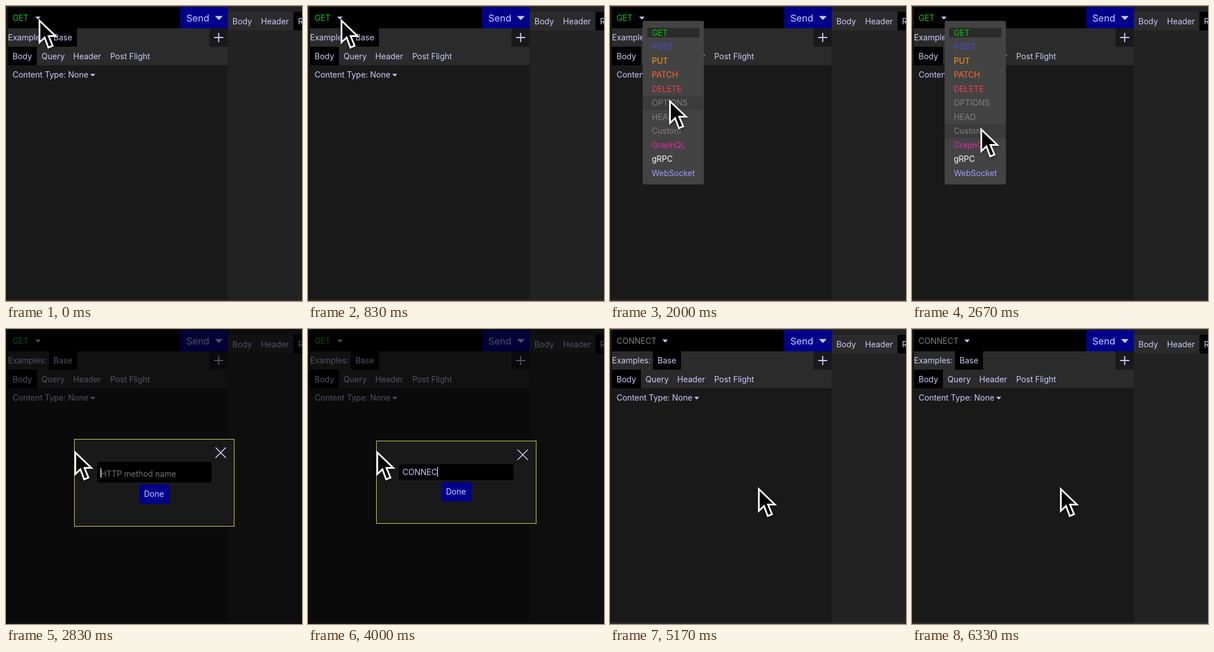
These frames come from a looping animation (517x515 px, 6490 ms). An HTML page:

```html
<!DOCTYPE html>
<html lang="en">
<head>
<meta charset="utf-8">
<title>Custom HTTP method</title>
<style>
  html, body { margin: 0; width: 100%; height: 100%; overflow: hidden; background: #191919; }
  svg { display: block; width: 517px; height: 515px; }
  text { font: 14px Inter, "Open Sans", sans-serif; fill: #ccccff; white-space: pre; }
  .big { font-size: 16.5px; }
  .off { display: none; }
  #cursor path { filter: drop-shadow(0 2px 2px rgba(0, 0, 0, .45)); }
</style>
</head>
<body>
<svg id="stage" viewBox="0 0 517 515"></svg>
<script>
const stage = document.getElementById('stage');
const LAVENDER = '#ccccff', BLUE = '#00008b', BAR = '#2b2b2b', GREY = '#808080';
const METHODS = [
  ['GET', '#00cc00'], ['POST', '#4a4ae0'], ['PUT', '#ff981a'], ['PATCH', '#ff6a26'],
  ['DELETE', '#f04040'], ['OPTIONS', GREY], ['HEAD', GREY], ['Custom', GREY],
  ['GraphQL', '#dc2ca4'], ['gRPC', '#ffffff'], ['WebSocket', '#9e9eff']
];
const ROW = 24.5, MENU_TOP = 34.5;

function add(parent, tag, attrs, content) {
  const el = document.createElementNS('http://www.w3.org/2000/svg', tag);
  for (const key in attrs) el.setAttribute(key, attrs[key]);
  if (content) el.textContent = content;
  return parent.appendChild(el);
}
const group = (parent, id) => add(parent, 'g', { id });
const rect = (p, x, y, width, height, fill, rx = 0) => add(p, 'rect', { x, y, width, height, fill, rx });
const text = (p, x, y, str, fill = LAVENDER) => add(p, 'text', { x, y, style: `fill:${fill}` }, str);
const arrow = (p, x, y, w, h) =>
  add(p, 'path', { d: `M${x} ${y}h${w}l${-w / 2} ${h}z`, fill: LAVENDER });
const line = (p, d, width) => add(p, 'path', { d, stroke: LAVENDER, 'stroke-width': width, fill: 'none' });
const show = (el, on) => el.classList.toggle('off', !on);
const move = (el, x, y) => el.setAttribute('transform', `translate(${x} ${y})`);

// Main window
const page = group(stage, 'page');
rect(page, 0, 0, 517, 515, '#191919');
rect(page, 387.5, 0, 130, 515, '#222222');
rect(page, 3.5, 2, 300.5, 37, '#000');
rect(page, 304, 2, 83.5, 37, BLUE);
rect(page, 3.5, 39, 384, 64.5, BAR);
rect(page, 75, 39, 49, 32, '#000');
rect(page, 355.5, 39, 32, 32, '#191919');
rect(page, 3.5, 71, 50.5, 32.5, '#000');
rect(page, 387.5, 10, 114.5, 32.5, BAR);
rect(page, 502, 10, 15, 32.5, '#000');
rect(page, 0, 0, 517, 2, '#303030');
rect(page, 0, 512.5, 517, 2.5, '#303030');
const method = text(page, 11.5, 25.5, 'GET');
const methodArrow = arrow(page, 0, 18.5, 9.5, 5);
text(page, 315, 26.8, 'Send').setAttribute('class', 'big');
arrow(page, 365, 17.5, 13.5, 7);
line(page, 'M363.5 55h16M371.5 47v16', 2);
const LABELS = [
  [3.5, 60, 'Examples:'], [83, 60, 'Base'],
  [11.5, 92.5, 'Body'], [62, 92.5, 'Query'], [117.5, 92.5, 'Header'], [182, 92.5, 'Post Flight'],
  [11.5, 125, 'Content Type: None'],
  [395.5, 31.5, 'Body'], [445.5, 31.5, 'Header'], [510, 31.5, 'Response']
];
for (const [x, y, str] of LABELS) text(page, x, y, str);
arrow(page, 147, 118.5, 9, 4.5);

// Method menu
const menu = group(stage, 'menu');
rect(menu, 57, 26, 107, 285.5, '#434343', 3);
const hover = rect(menu, 57, 0, 107, ROW, '#3b3b3b');
rect(menu, 65, 38, 91, 17, '#2b2b2b');
METHODS.forEach(([name, color], i) => text(menu, 73, 51.6 + i * ROW, name, color));

// Dialog; its input is taller while the placeholder shows
const dialog = group(stage, 'dialog');
rect(dialog, 0, 0, 517, 515, 'rgba(0,0,0,.6)');
const box = rect(dialog, 119.5, 0, 279, 0, '#191919');
box.setAttribute('stroke', '#d4d445');
const close = line(dialog, 'M-9 -9L9 9M9 -9L-9 9', 1.6);
const input = rect(dialog, 159, 0, 200, 0, '#000', 4);
const entry = text(dialog, 165, 0, '');
const caret = rect(dialog, 0, 0, 1.2, 17, '#ffffff');
const done = group(dialog, 'done');
rect(done, 233, 0, 52.5, 33.5, BLUE);
text(done, 241, 21.8, 'Done');

const cursor = group(stage, 'cursor');
add(cursor, 'path', {
  d: 'M2 4V42L11 33.5L17.5 51L25 48L18 31H30Z',
  fill: '#000', stroke: '#fff', 'stroke-width': 3, 'stroke-miterlimit': 6
});

// Timing, in steps of a sixth of a second
const LOOP = 6490, FPS = 6;
const OPEN = 7, DIALOG = 17, TYPE = 19, CLOSE = 31;
const PATH = [
  [0, 56.5, 21.5], [8, 56.5, 21.5], [14, 119, 211.5], [25, 119, 211.5], [29, 258, 275.5], [39, 258, 275.5]
];
const ease = u => u * u * (3 - 2 * u);

function cursorAt(k) {
  const i = PATH.findIndex((p, n) => k >= p[0] && k < PATH[n + 1][0]);
  const [k0, x0, y0] = PATH[i], [k1, x1, y1] = PATH[i + 1];
  const u = ease((k - k0) / (k1 - k0));
  return [x0 + (x1 - x0) * u, y0 + (y1 - y0) * u];
}

function drawDialog(k) {
  const typed = 'CONNECT'.slice(0, Math.max(0, k - TYPE + 1));
  const tall = typed ? 0 : 4;
  box.setAttribute('y', 196 - tall + .5);
  box.setAttribute('height', 144 + tall * 2);
  box.setAttribute('y', 195.5 - tall * .75);
  move(close, 375, 219.5 - tall * .9);
  input.setAttribute('y', 236 - tall);
  input.setAttribute('height', 28 + tall * 2);
  entry.textContent = typed || 'HTTP method name';
  entry.style.fill = typed ? LAVENDER : '#757575';
  entry.setAttribute('y', typed ? 255 : 257.5);
  caret.setAttribute('x', 165 + (typed ? entry.getComputedTextLength() : 0));
  caret.setAttribute('y', typed ? 241 : 242.5);
  move(done, 0, 267.5 + tall);
}

function draw(t) {
  const k = Math.min(38, Math.floor(t * FPS / 1000 + .05));
  const [x, y] = cursorAt(k);
  const row = Math.floor((y - MENU_TOP) / ROW);
  const custom = k >= CLOSE;
  move(cursor, x, y);
  show(menu, k >= OPEN && k < DIALOG);
  show(hover, row >= 0);
  hover.setAttribute('y', MENU_TOP + row * ROW);
  method.textContent = custom ? 'CONNECT' : 'GET';
  method.style.fill = custom ? GREY : '#14c814';
  move(methodArrow, custom ? 91.5 : 51, 0);
  const open = k >= DIALOG && k < CLOSE;
  show(dialog, open);
  if (open) drawDialog(k);
}

const start = performance.now();
function tick() {
  draw((performance.now() - start) % LOOP);
  requestAnimationFrame(tick);
}
tick();
</script>
</body>
</html>
```
